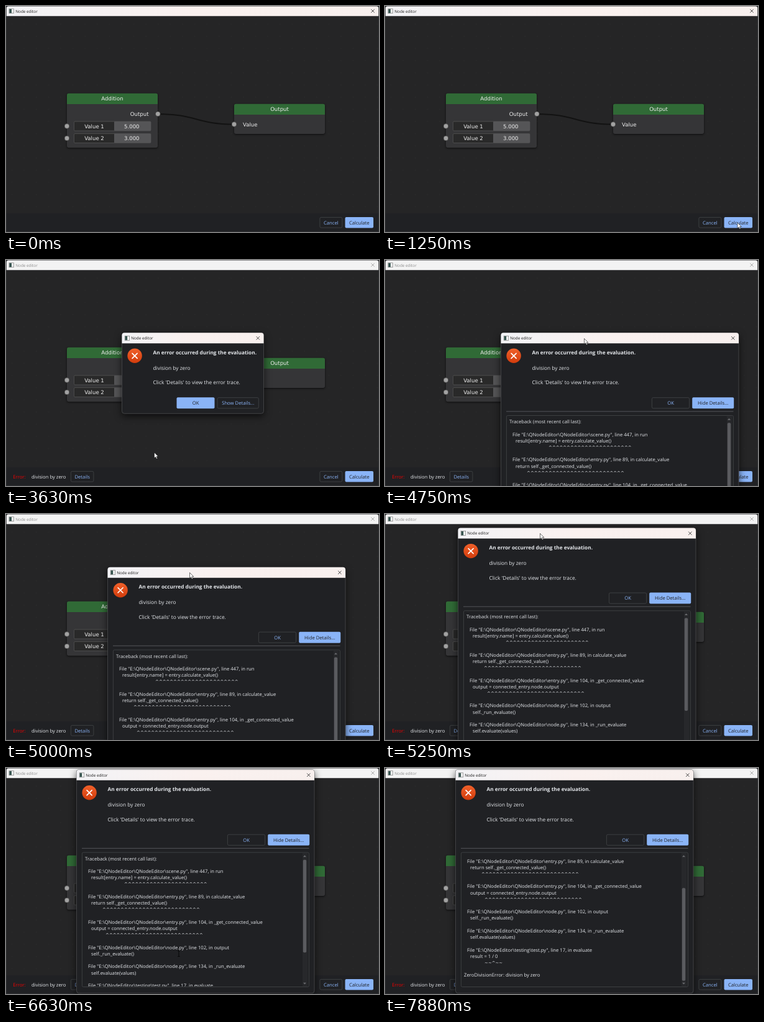
An HTML page that plays this animation: 600x364 px, repeating every 8000 ms.

```html
<!DOCTYPE html>
<html lang="en">
<head>
<meta charset="utf-8">
<title>Node editor</title>
<style>
html, body { margin: 0; width: 100%; height: 100%; overflow: hidden; background: #202124; }
svg { display: block; width: 100vw; height: 100vh; }
text { font: 7.7px "Open Sans", "Noto Sans", sans-serif; fill: #e4e7eb; text-rendering: geometricPrecision; white-space: pre; }
.caption { font-size: 6.35px; fill: #1c1c1c; }
.close { stroke: #222; stroke-width: .8; fill: none; }
.inactive .caption { fill: #8c8c8c; }
.inactive .close { stroke: #999; }
.inactive .bar { fill: #f3f3f3; }
.bar { fill: url(#mica); }
.node text { font: 8.55px "DejaVu Sans", sans-serif; fill: #eee; }
.node { filter: drop-shadow(0 1.5px 1.5px #0b0b0b); }
.message { font-size: 8.33px; }
.heading { font-size: 8.25px; font-weight: bold; }
.mark { font: 6.93px "DejaVu Sans", sans-serif; }
.shadow { filter: drop-shadow(0 4px 6px #000a); }
.mid { text-anchor: middle; }
</style>
</head>
<body>
<svg id="stage" viewBox="0 0 600 364" xmlns="http://www.w3.org/2000/svg"></svg>
<script>
const STEP = 125, LOOP = 8000;
const ERROR_AT = 1500, OPEN_AT = 3000, EXPAND_AT = 4250, DRAG_AT = 4875, DROP_AT = 5625, LEAVE_AT = 7250;
const HOME = [186.5, 117.3], WIDE = 382.5, NARROW = 228;
const LINE = 10.22;

// Pointer path: time, x, y
const path = [
  [625, 562, 376], [1125, 567, 349], [1500, 567, 349], [2375, 164, 354], [2625, 124, 350],
  [2875, 124, 350], [3625, 238.5, 310], [4000, 371, 231], [4250, 371, 231], [4750, 320.5, 126.5],
  [4875, 318.5, 126], [5250, 249.5, 31.3], [5625, 245.5, 11.5], [5875, 245.5, 11.5], [6500, 278, 299]
];

// Traceback rows: row, indent, text
const trace = [
  [0, 0, 'Traceback (most recent call last):'],
  [2, 5, 'File "E:\\QNodeEditor\\QNodeEditor\\scene.py", line 447, in run'],
  [3, 10, 'result[entry.name] = entry.calculate_value()'],
  [4, 63, '^'.repeat(23)],
  [6, 5, 'File "E:\\QNodeEditor\\QNodeEditor\\entry.py", line 89, in calculate_value'],
  [7, 10, 'return self._get_connected_value()'],
  [8, 28, '^'.repeat(27)],
  [10, 5, 'File "E:\\QNodeEditor\\QNodeEditor\\entry.py", line 104, in _get_connected_value'],
  [11, 10, 'output = connected_entry.node.output'],
  [12, 33, '^'.repeat(27)],
  [14, 5, 'File "E:\\QNodeEditor\\QNodeEditor\\node.py", line 102, in output'],
  [15, 10, 'self._run_evaluate()'],
  [17, 5, 'File "E:\\QNodeEditor\\QNodeEditor\\node.py", line 134, in _run_evaluate'],
  [18, 10, 'self.evaluate(values)'],
  [20, 5, 'File "E:\\QNodeEditor\\testing\\test.py", line 17, in evaluate'],
  [21, 10, 'result = 1 / 0'],
  [22, 33, '~~^~~'],
  [24, 0, 'ZeroDivisionError: division by zero']
];

const text = (x, y, s, cls = '', extra = '') => `<text x="${x}" y="${y}" class="${cls}" ${extra}>${s}</text>`;
const rect = (x, y, w, h, fill, extra = '') => `<rect x="${x}" y="${y}" width="${w}" height="${h}" fill="${fill}" ${extra}/>`;
const socket = (x, y) => `<circle cx="${x}" cy="${y}" r="3.9" fill="#a2a2a2" stroke="#2a2a2a" stroke-width=".6"/>`;
const cross = (x, y) => `<path class="close" d="M${x - 2.7} ${y - 2.7}l5.4 5.4m0-5.4l-5.4 5.4"/>`;
const appIcon = (x, y) => rect(x, y, 7.5, 7, '#fafafa', 'stroke="#777" stroke-width=".7"') + rect(x + .4, y + .4, 3.6, 6.2, '#36544f');

function button(x, y, w, h, label, filled) {
  const frame = filled ? rect(x, y, w, h, '#8ab4f7', 'rx="2"')
    : rect(x + .4, y + .4, w - .8, h - .8, 'none', 'rx="2" stroke="#45474a" stroke-width=".8"');
  return frame + text(x + w / 2, y + h / 2 + 2.8, label, 'mid', `style="fill:${filled ? '#202124' : '#8ab4f7'}"`);
}

function node(x, y, h, title, body) {
  return `<g class="node">${rect(x, y, 146, h, '#353537', 'rx="3"')}
    <path d="M${x} ${y + 17.3}v-14.3q0-3 3-3h140q3 0 3 3v14.3z" fill="#306a36"/>
    ${text(x + 73, y + 11.5, title, 'mid')}${body}</g>`;
}

function field(y, label, value) {
  return rect(109.4, y, 123.6, 15, '#292929', 'rx="1.5" stroke="#555" stroke-width=".8"')
    + rect(174, y, 59, 15, '#555557', 'rx="1"')
    + text(142, y + 10.7, label, 'mid') + text(202.3, y + 10.7, value, 'mid');
}

function dialog(w, h, body) {
  return `<g class="shadow">${rect(0, 0, w, h, '#202124', 'rx="4" stroke="#4c4d50" stroke-width=".8"')}</g>
    <path class="bar" d="M0 17V4q0-4 4-4h${w - 8}q4 0 4 4v13z"/>
    ${appIcon(4.7, 5)}${text(14.7, 10.8, 'Node editor', 'caption')}${cross(w - 9.2, 8.5)}
    <circle cx="20.6" cy="37" r="11.7" fill="url(#alert)"/>
    <path d="M16.6 33l8 8m0-8l-8 8" stroke="#fff" stroke-width="1.7" stroke-linecap="round"/>
    ${text(50, 34.7, 'An error occurred during the evaluation.', 'heading')}
    ${text(50, 59.7, 'division by zero', 'message')}
    ${text(50, 83, "Click 'Details' to view the error trace.", 'message')}${body}`;
}

const buttons = (w, label, expanded) =>
  button(w - 140, 104, 61, 18, 'OK', !expanded) + button(w - 74.8, 104, 67, 18, label, expanded);

const traceLines = trace.map(([row, indent, s]) =>
  text(13.6 + indent, 145.8 + row * LINE, s, /^[\^~]+$/.test(s) ? 'mark' : '')).join('');

const details = rect(8.5, 126, 365.5, 1.2, '#4b4c50')
  + rect(8.9, 133.2, 365, 216.5, '#202124', 'rx="2" stroke="#45474a" stroke-width=".8"')
  + `<g clip-path="url(#page)"><g id="trace">${traceLines}</g></g>`
  + rect(363.5, 134, 8.5, 215, '#27282b')
  + '<path d="M364.5 140.5l2.5-2.8 2.5 2.8zM364.5 343l2.5 2.8 2.5-2.8z" fill="#6b6c70"/>'
  + '<rect id="thumb" x="364.3" width="5.4" height="149.5" rx="2" fill="#5a5b5f"/>';

const stage = document.getElementById('stage');
stage.innerHTML = `
<defs>
  <linearGradient id="mica"><stop stop-color="#f3f3f6"/><stop offset=".5" stop-color="#faf1ef"/><stop offset="1" stop-color="#f8f0ee"/></linearGradient>
  <linearGradient id="alert" x2="0" y2="1"><stop stop-color="#f0602a"/><stop offset="1" stop-color="#d23c0c"/></linearGradient>
  <pattern id="grid" width="19.6" height="19.6" patternUnits="userSpaceOnUse"><rect x="9" y="9" width="1.1" height="1.1" fill="#2e2e2e"/></pattern>
  <clipPath id="page"><rect x="9.5" y="134" width="353" height="215"/></clipPath>
</defs>
${rect(0, 0, 600, 364, '#202124')}
<g id="main">
  <path class="bar" d="M.5 16.5V4q0-3.5 3.5-3.5h592q3.5 0 3.5 3.5v12.5z"/>
  ${appIcon(5, 4.7)}${text(15.3, 10.5, 'Node editor', 'caption')}${cross(590, 8)}
</g>
${rect(0, 16.5, 600, 317.5, '#252526')}${rect(0, 16.5, 600, 317.5, 'url(#grid)')}
<path d="M244 174C306 174 306 190.5 367 190.5" fill="none" stroke="#121212" stroke-width="2"/>
${node(98, 140.7, 87.5, 'Addition', text(229.5, 177.2, 'Output', '', 'text-anchor="end"')
  + field(186, 'Value 1', '5.000') + field(205.6, 'Value 2', '3.000'))}
${node(367, 157.7, 48.3, 'Output', text(381, 193.7, 'Value'))}
${socket(244.3, 173.8)}${socket(98, 193.5)}${socket(98, 213)}${socket(367, 190.5)}
<g id="error">
  ${text(11.3, 351.8, 'Error:', '', 'style="fill:#f00000"')}${text(41, 351.8, 'division by zero')}
  ${button(104, 340, 37.3, 17.5, 'Details')}
</g>
${button(504.5, 340, 36.7, 17.5, 'Cancel')}${button(545.5, 340, 45.5, 17.5, 'Calculate', true)}
<path d="M.4 0V364M599.6 0V364M0 363.7H600" stroke="#3a3b3d" stroke-width=".7"/>
<g id="compact" transform="translate(${HOME})">${dialog(NARROW, 130, buttons(NARROW, 'Show Details...', false))}</g>
<g id="expanded">${dialog(WIDE, 360, buttons(WIDE, 'Hide Details...', true) + details)}</g>
<path id="arrow" d="M0 0v9l2.1-1.9 1.5 3.2 1.5-.7-1.5-3.1h2.8z" fill="#fff" stroke="#111" stroke-width=".6"/>
<path id="beam" d="M-1.8-4.5h3.6M0-4.5v9M-1.8 4.5h3.6" stroke="#050505" stroke-width=".9"/>`;

const el = id => document.getElementById(id);
const show = (id, on) => el(id).setAttribute('display', on ? 'inline' : 'none');
const move = (id, x, y) => el(id).setAttribute('transform', `translate(${x} ${y})`);

function pointerAt(t) {
  const i = path.findIndex(key => key[0] > t);
  if (i === 0) return path[0].slice(1);
  if (i < 0) return path.at(-1).slice(1);
  const [t0, x0, y0] = path[i - 1], [t1, x1, y1] = path[i];
  const k = (t - t0) / (t1 - t0);
  return [x0 + (x1 - x0) * k, y0 + (y1 - y0) * k];
}

function render(time) {
  const t = Math.floor((time % LOOP) / STEP) * STEP;
  const [x, y] = pointerAt(t);
  const grab = pointerAt(DRAG_AT);
  const held = pointerAt(Math.min(Math.max(t, DRAG_AT), DROP_AT));
  const left = HOME[0] + held[0] - grab[0], top = HOME[1] + held[1] - grab[1];
  const scroll = t < 7000 ? 0 : t < LEAVE_AT ? 3 * LINE : 57.4;

  show('error', t >= ERROR_AT);
  show('compact', t >= OPEN_AT && t < EXPAND_AT);
  show('expanded', t >= EXPAND_AT);
  el('main').setAttribute('class', t >= OPEN_AT ? 'inactive' : '');
  move('expanded', left, top);
  move('trace', 0, -scroll);
  el('thumb').setAttribute('y', 145 + scroll * .79);

  const overText = t > DROP_AT && y > top + 133;
  show('arrow', t > path[0][0] && !overText);
  show('beam', overText && t < LEAVE_AT);
  move('arrow', x, y);
  move('beam', x, y);
}

const start = performance.now();
function tick() {
  render(performance.now() - start);
  requestAnimationFrame(tick);
}
tick();
</script>
</body>
</html>
```
